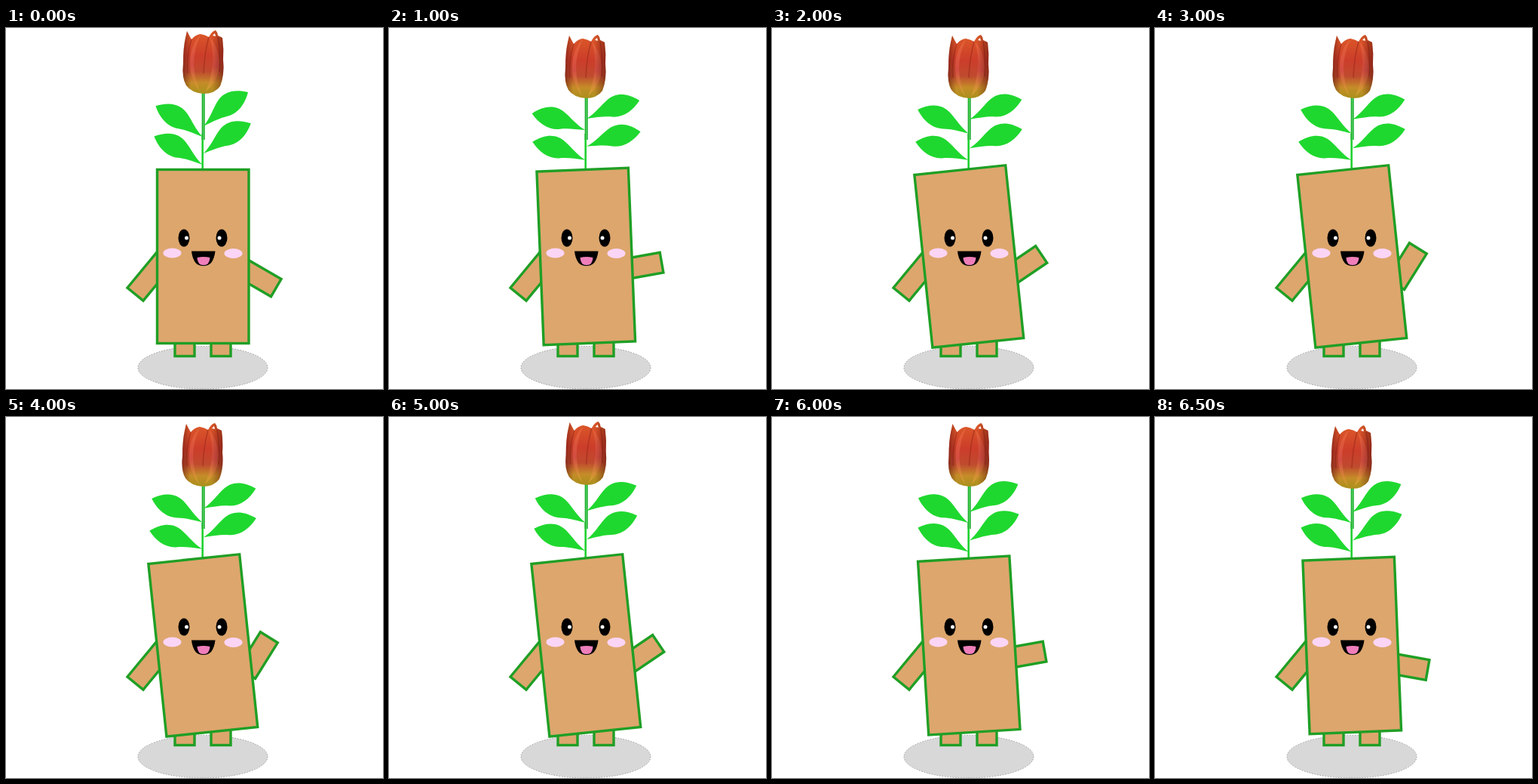
An HTML page that plays this animation: 500 px wide and 478 px high, repeating every 7000 ms.

```html
<!DOCTYPE html>
<html lang="en">
<head>
<meta charset="utf-8">
<title>Waving flower pot</title>
<style>
html, body { margin: 0; width: 100%; height: 100%; overflow: hidden; background: #fff; }
svg { display: block; width: 100%; height: 100%; }
.wood { fill: #dda66d; stroke: #1f9f25; stroke-width: 3.4; }
.leaf { fill: #1fd82f; }
</style>
</head>
<body>
<svg viewBox="0 0 500 478">
  <defs>
    <linearGradient id="petal" x1="0" y1="0" x2="0" y2="1">
      <stop offset="0" stop-color="#dc5a28"/>
      <stop offset=".4" stop-color="#cc3d2a"/>
      <stop offset=".65" stop-color="#bf4a2e"/>
      <stop offset=".83" stop-color="#c58c28"/>
      <stop offset="1" stop-color="#aa901c"/>
    </linearGradient>
    <linearGradient id="glow" x1="0" y1="0" x2="0" y2="1">
      <stop offset="0" stop-color="#ea6a3c"/>
      <stop offset=".55" stop-color="#d8504a"/>
      <stop offset="1" stop-color="#d9ae30"/>
    </linearGradient>
    <linearGradient id="shade">
      <stop offset="0" stop-color="#501008" stop-opacity=".5"/>
      <stop offset=".2" stop-color="#501008" stop-opacity="0"/>
      <stop offset=".72" stop-color="#501008" stop-opacity="0"/>
      <stop offset="1" stop-color="#501008" stop-opacity=".5"/>
    </linearGradient>
    <path id="tulip" d="M240 4Q243 10 246 15Q251 9 258 8Q264 9 269 12Q273 4 278 3Q281 6 281 10L287 13Q289 28 288 42Q290 62 284 77Q277 87 262 87Q246 86 239 76Q233 66 235 47Q235 26 238 13Z"/>
    <path id="blade" d="M0 0C9-11 12-22 18-32C25-44 38-50 59-45C55-29 45-16 31-13C22-11 12-6 0 0Z"/>
  </defs>

  <ellipse cx="261" cy="449.7" rx="86" ry="28.3" fill="#d8d8d8" stroke="#888" stroke-width=".8" stroke-dasharray="1.5 2"/>
  <rect class="wood" x="224" y="412" width="26" height="22.5"/>
  <rect class="wood" x="272" y="412" width="26" height="22.5"/>
  <path class="wood" d="M161 344L205 291L226 308L182 361Z"/>
  <rect class="wood" id="arm" x="-28" y="-13.5" width="56" height="27"/>

  <path d="M260.700 140V188" stroke="#1fd02f" stroke-width="2.6"/>
  <path d="M261.700 84V148" stroke="#18a82a" stroke-width="4"/>
  <path d="M261.700 84V148" stroke="#5fdc68" stroke-width="1.2"/>
  <g id="leaves"></g>
  <g id="flower">
    <use href="#tulip" fill="url(#petal)"/>
    <path fill="url(#glow)" d="M258 9Q249 28 249 48Q250 68 257 84Q243 66 244 43Q245 22 258 9ZM270 12Q276 31 274 50Q271 70 265 84Q284 67 283 45Q281 23 270 12Z" opacity=".75"/>
    <path fill="none" stroke="#9c2a1c" stroke-width="1.5" opacity=".6" d="M246 15Q239 38 241 60M269 12Q263 34 262 60M281 12Q285 34 283 58"/>
    <use href="#tulip" fill="url(#shade)"/>
    <path fill="#fff" d="M274 10L277 7L278 11Z"/>
  </g>

  <rect class="wood" id="box" x="200.5" y="187.5" width="121.5" height="230"/>

  <g fill="#000">
    <ellipse cx="236" cy="278" rx="7.5" ry="11.5"/>
    <ellipse cx="286" cy="278" rx="7.5" ry="11.5"/>
    <path d="M246 295.500H277.500Q276.500 305 272 311Q268 315 262 315Q255 315 251.500 311Q247 305 246 295.500Z"/>
  </g>
  <g fill="#fff">
    <circle cx="239.5" cy="278" r="2.5"/>
    <circle cx="283" cy="278" r="2.5"/>
  </g>
  <path fill="#ee7fbb" d="M253.500 304Q262 302 270.500 304Q270 314 262 314Q254 314 253.500 304Z"/>
  <g fill="#fbd5f5">
    <ellipse cx="220.5" cy="298" rx="12" ry="6.5"/>
    <ellipse cx="301.5" cy="298.500" rx="12" ry="6.5"/>
  </g>
</svg>
<script>
const STEP = 500, COUNT = 14;
const $ = id => document.getElementById(id);
const place = (el, value) => el.setAttribute("transform", value);

// Linear path through [step, value] key points
const track = keys => step => {
  const n = Math.max(1, keys.findIndex(([s]) => s >= step));
  const [s0, v0] = keys[n - 1], [s1, v1] = keys[n];
  return v0 + (v1 - v0) * (step - s0) / (s1 - s0);
};

const wave = track([[0, 30], [2, -10], [6, -58], [7, -46], [8, -58], [12, -10], [14, 30]]);
const tilt = track([[0, 0], [2, 2.3], [4, 6], [10, 6], [13, 2.3], [14, 0]]);
const bob = track([[0, 0], [2, 6], [4, 6], [5, 2], [6, 6], [8, 5], [11, 2], [13, 8], [14, 0]]);
const sway = track([[0, 0], [2, -1], [4, -1], [6, 1], [8, -1], [11, 0], [13, -1], [14, 0]]);

// A leaf dips to low, rests at mid, then lifts to late
function leaf(side, x, y, rest, low, mid, late) {
  const el = document.createElementNS("http://www.w3.org/2000/svg", "use");
  el.setAttribute("href", "#blade");
  el.setAttribute("class", "leaf");
  $("leaves").append(el);
  const droop = track([[0, 0], [2, low], [4, mid], [8, mid], [11, late], [13, late], [14, 0]]);
  return step => {
    const d = droop(step);
    place(el, `translate(${x} ${y - d * 0.54}) scale(${side} 1) rotate(${rest + d})`);
  };
}

const leaves = [
  leaf(1, 262, 130, 0, 18.5, 16.5, 7.5),
  leaf(-1, 260.5, 144, 4, 16, 8.3, 7),
  leaf(1, 262, 166, 5, 17, 12.5, 4.3),
  leaf(-1, 260.5, 181, 7, 11.5, 11.5, 4.8)
];

function draw(ms) {
  const step = Math.floor(ms / STEP) % COUNT;
  const angle = wave(step);
  // The shoulder drops while the arm hangs
  place($("arm"), `translate(334 ${angle > 0 ? 330 : 315.5}) rotate(${angle})`);
  place($("box"), `rotate(${-tilt(step)} 261 302)`);
  place($("flower"), `translate(${sway(step)} ${bob(step)})`);
  leaves.forEach(move => move(step));
}

const start = performance.now();
function tick() {
  draw(performance.now() - start);
  requestAnimationFrame(tick);
}
tick();
</script>
</body>
</html>
```
